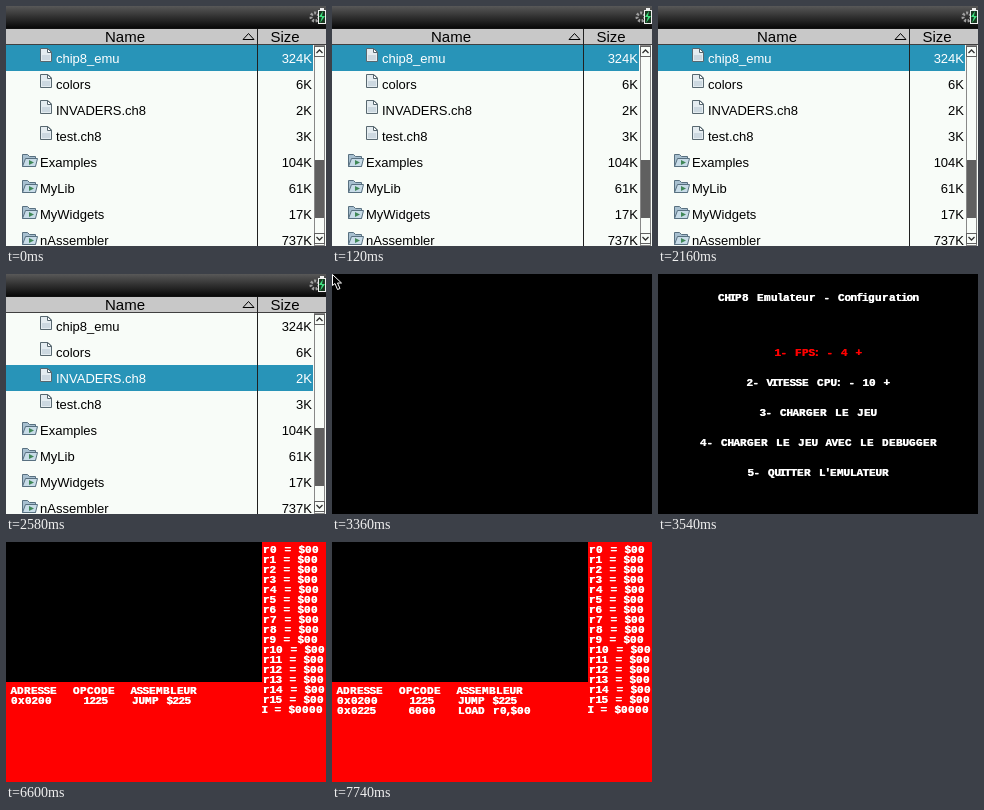
Write an HTML page with a canvas that moves like this. It is 320 by 240 pixels and loops after 8000 ms.

```html
<!DOCTYPE html>
<html lang="fr">
<head>
<meta charset="utf-8">
<title>CHIP8 Emulateur</title>
<style>
html, body { margin: 0; width: 100%; height: 100%; overflow: hidden; background: #000; }
canvas { display: block; width: 320px; height: 240px; }
</style>
</head>
<body>
<canvas id="stage" width="320" height="240"></canvas>
<script>
const ctx = document.getElementById('stage').getContext('2d');
const LOOP = 8000;
const SANS = '"Liberation Sans", Arial, sans-serif';
const MONO = 'bold 11px "Liberation Mono", monospace';
const BLUE = '#2894b8';
const PAPER = '#f8fcf8';

const ROWS = [
  ['file', 'chip8_emu', '324K'],
  ['file', 'colors', '6K'],
  ['file', 'INVADERS.ch8', '2K'],
  ['file', 'test.ch8', '3K'],
  ['folder', 'Examples', '104K'],
  ['folder', 'MyLib', '61K'],
  ['folder', 'MyWidgets', '17K'],
  ['folder', 'nAssembler', '737K']
];

const MESSAGE = [
  'Extension .ch8 et .chip8 enregistre.',
  "Il vous suffit maintenant d'ouvrir",
  'un fichier .ch8 ou .chip8',
  "pour que l'emulateur se lance et",
  'charge automatiquement la rom.'
];

const MENU = [
  '1- FPS: - 4 +',
  '2- VITESSE CPU: - 10 +',
  '3- CHARGER LE JEU',
  '4- CHARGER LE JEU AVEC LE DEBUGGER',
  "5- QUITTER L'EMULATEUR"
];

function rect(x, y, w, h, fill) {
  ctx.fillStyle = fill;
  ctx.fillRect(x, y, w, h);
}

function frame(x, y, w, h, stroke, width = 1) {
  ctx.strokeStyle = stroke;
  ctx.lineWidth = width;
  ctx.strokeRect(x + width / 2, y + width / 2, w - width, h - width);
}

function shade(x, y, w, h, from, to) {
  const g = ctx.createLinearGradient(0, y, 0, y + h);
  g.addColorStop(0, from);
  g.addColorStop(1, to);
  rect(x, y, w, h, g);
}

function trace(points) {
  ctx.beginPath();
  points.forEach(([x, y]) => ctx.lineTo(x, y));
}

function poly(points, fill, stroke) {
  trace(points);
  ctx.closePath();
  if (fill) { ctx.fillStyle = fill; ctx.fill(); }
  if (stroke) { ctx.strokeStyle = stroke; ctx.lineWidth = 1; ctx.stroke(); }
}

function label(str, x, y, color = '#000', align = 'left', size = 13) {
  ctx.font = `${size}px ${SANS}`;
  ctx.textAlign = align;
  ctx.fillStyle = color;
  ctx.fillText(str, x, y);
}

// Console glyphs are set solid: each advances by its own cell.
function advance(c) {
  if (c === ' ') return 8;
  if ("I:',".includes(c)) return 4;
  if ('il'.includes(c)) return 5;
  return 'AHSTUV123569-+=$enoft'.includes(c) ? 6 : 7;
}

const textWidth = str => [...str].reduce((sum, c) => sum + advance(c), 0);

// Two passes half a pixel apart give the heavy upright stems.
function mono(str, x, y, color = '#fff') {
  ctx.font = MONO;
  ctx.textAlign = 'center';
  ctx.fillStyle = color;
  for (const c of str) {
    const mid = x + advance(c) / 2;
    ctx.fillText(c, mid - .5, y);
    ctx.fillText(c, mid, y);
    x += advance(c);
  }
}

const monoCentered = (str, y, color) =>
  mono(str, Math.round(160.5 - textWidth(str) / 2), y, color);

function fileIcon(x, y) {
  poly([[x + .5, y + .5], [x + 8, y + .5], [x + 11.5, y + 4], [x + 11.5, y + 13.5], [x + .5, y + 13.5]], '#e4ecf0', '#586870');
  poly([[x + 7.5, y + .5], [x + 7.5, y + 4.5], [x + 11.5, y + 4.5]], '#fff', '#586870');
  rect(x + 2, y + 7, 8, 5, '#ccd8e0');
}

function folderIcon(x, y) {
  poly([[x + .5, y + 12.5], [x + .5, y + .5], [x + 5.5, y + .5], [x + 7.5, y + 2.5], [x + 13.5, y + 2.5], [x + 13.5, y + 12.5]], '#a8c0d0', '#587080');
  poly([[x + .5, y + 12.5], [x + 3.5, y + 4.5], [x + 15.5, y + 4.5], [x + 13.5, y + 12.5]], '#c8dce8', '#587080');
  poly([[x + 7, y + 6], [x + 12, y + 8.5], [x + 7, y + 11]], '#408858');
}

function statusBar() {
  shade(0, 0, 320, 22, '#585858', '#080808');
  ctx.strokeStyle = '#a0a0a0';
  ctx.lineWidth = 3;
  ctx.setLineDash([2, 1.5]);
  ctx.beginPath();
  ctx.arc(309, 11, 4, 0, Math.PI * 2);
  ctx.stroke();
  ctx.setLineDash([]);
  rect(312, 4, 8, 14, '#f0f0f0');
  rect(314, 2, 4, 2, '#f0f0f0');
  rect(313, 5, 6, 12, '#183820');
  poly([[317, 5], [313, 11], [316, 11], [314, 17], [319, 10], [316, 10]], '#40e080');
}

function scrollArrow(y, dir) {
  frame(308, y, 11, 11, '#606060');
  const mid = y + 5.5;
  trace([[310.5, mid + dir * 1.5], [313.5, mid - dir * 1.5], [316.5, mid + dir * 1.5]]);
  ctx.strokeStyle = '#303030';
  ctx.lineWidth = 1.3;
  ctx.stroke();
}

function scrollBar() {
  rect(307, 39, 13, 201, PAPER);
  frame(308, 39, 11, 201, '#888');
  scrollArrow(40, 1);
  scrollArrow(227, -1);
  rect(309, 154, 9, 58, '#606060');
}

function drawList(selected) {
  rect(0, 0, 320, 240, PAPER);
  statusBar();
  rect(0, 22, 320, 1, '#101010');
  rect(0, 23, 320, 15, '#c8c8c8');
  rect(0, 38, 320, 1, '#404040');
  label('Name', 119, 36, '#000', 'center', 15);
  label('Size', 279, 36, '#000', 'center', 15);
  poly([[237, 33.5], [242.5, 27.5], [248, 33.5]], null, '#000');

  ROWS.forEach(([kind, name, size], i) => {
    const y = 39 + i * 26;
    const on = i === selected;
    const color = on ? '#fff' : '#000';
    if (on) rect(0, y, 307, 26, BLUE);
    if (kind === 'file') fileIcon(34, y + 3);
    else folderIcon(16, y + 5);
    label(name, kind === 'file' ? 50 : 34, y + 18, color);
    label(size, 306, y + 18, color, 'right');
  });
  rect(251, 23, 1, 217, '#202020');
  scrollBar();
}

function drawDialog() {
  rect(41, 31, 239, 178, '#686868');
  rect(42, 32, 234, 173, '#dcdcdc');
  shade(42, 32, 234, 23, '#606060', '#202020');
  label('CHIP8 Emulateur', 160, 47, '#fff', 'center');
  frame(49, 61, 220, 97, '#505050');
  MESSAGE.forEach((line, i) => label(line, 54, Math.round(77 + i * 18.75)));
  rect(48, 164, 221, 2, '#686868');

  rect(142, 168, 34, 34, '#f0f4f0');
  frame(142, 168, 34, 34, BLUE, 2);
  rect(147, 173, 26, 26, '#808080');
  ctx.beginPath();
  ctx.roundRect(145.5, 171.5, 25, 25, 3);
  ctx.fillStyle = '#fff';
  ctx.fill();
  ctx.strokeStyle = '#404040';
  ctx.lineWidth = 1;
  ctx.stroke();
  label('OK', 158.5, 189, '#000', 'center');
}

function drawPointer() {
  rect(0, 0, 320, 240, '#000');
  poly([[.5, .5], [.5, 11.5], [3, 9.5], [5.5, 15.5], [8, 14.5], [5.5, 9], [9.5, 9]], '#000', '#fff');
}

function drawMenu(selected) {
  rect(0, 0, 320, 240, '#000');
  monoCentered('CHIP8 Emulateur - Configuration', 27);
  MENU.forEach((item, i) => monoCentered(item, 82 + i * 30, i === selected ? '#f00' : '#fff'));
}

function drawDebugger(steps) {
  rect(0, 0, 320, 240, '#f00');
  rect(0, 0, 256, 140, '#000');
  for (let i = 0; i < 16; i++) mono(`r${i} = $00`, 257, 11 + i * 10);
  mono('I = $0000', 257, 171);
  mono('ADRESSE', 5, 152);
  mono('OPCODE', 67, 152);
  mono('ASSEMBLEUR', 125, 152);
  const log = [['0x0200', '1225', 'JUMP $225'], ['0x0225', '6000', 'LOAD r0,$00']];
  log.slice(0, steps).forEach(([address, opcode, code], i) => {
    const y = 162 + i * 10;
    mono(address, 5, y);
    mono(opcode, Math.round(90 - textWidth(opcode) / 2), y);
    mono(code, 126, y);
  });
}

function draw(t) {
  if (t < 3360) {
    drawList(t < 2400 ? 0 : t < 2520 ? 1 : 2);
    if (t >= 1500 && t < 2100) drawDialog();
  } else if (t < 3540) {
    drawPointer();
  } else if (t < 6600) {
    drawMenu(t < 4440 ? 0 : 3);
  } else {
    drawDebugger(t < 7740 ? 1 : 2);
  }
}

const start = performance.now();
function tick() {
  draw((performance.now() - start) % LOOP);
  requestAnimationFrame(tick);
}
tick();
</script>
</body>
</html>
```
